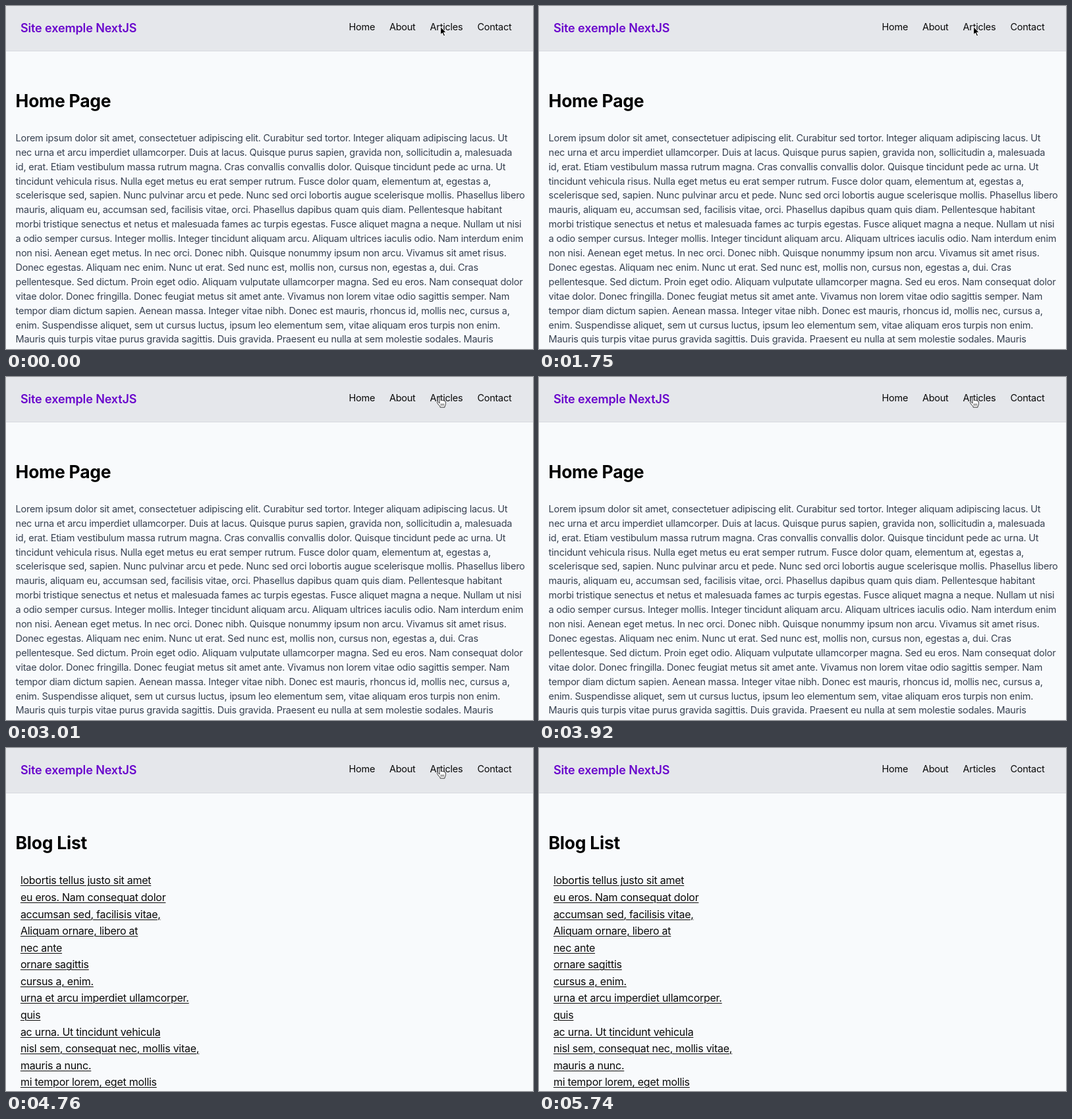
An HTML page for the animation above (5.81 s loop, 800 by 522 pixels).

```html
<!DOCTYPE html>
<html lang="fr">
<head>
<meta charset="utf-8">
<title>Site exemple NextJS</title>
<style>
  html, body { margin: 0; width: 100%; height: 100%; overflow: hidden; }
  body {
    position: relative;
    background: #f8fafc;
    color: #0a0a0a;
    font: 14.5px/22px Inter, "Noto Sans", sans-serif;
    font-optical-sizing: none;
    letter-spacing: -.018em;
    white-space: pre;
    cursor: default;
  }
  header { position: absolute; inset: 0 0 auto; height: 68px; background: #e5e7eb; border-bottom: 1px solid #d7d9de; }
  .brand { position: absolute; left: 21.9px; top: 21.5px; font-size: 18px; line-height: 24px; font-weight: 600; letter-spacing: -.007em; color: #6906cc; }
  nav span { position: absolute; top: 20.7px; }
  h1 { position: absolute; left: 14.6px; top: 129px; margin: 0; font-size: 26.5px; line-height: 30px; font-weight: 700; letter-spacing: -.01em; color: #000; }
  p { position: absolute; left: 14.6px; top: 189.8px; margin: 0; line-height: 21.9px; color: #374151; }
  ul { position: absolute; left: 21.9px; top: 189.4px; margin: 0; padding: 0; list-style: none; font-size: 16px; line-height: 25.58px; letter-spacing: -.0165em; }
  li { text-decoration: underline 1px; text-underline-offset: 2px; }
  #cursor { position: absolute; left: 0; top: 0; width: 20px; height: 22px; overflow: visible; }
  [hidden] { display: none; }
</style>
</head>
<body>
<header>
  <div class="brand">Site exemple NextJS</div>
  <nav><span style="left:520.6px">Home</span><span style="left:582px">About</span><span style="left:643.6px">Articles</span><span style="left:715.4px">Contact</span></nav>
</header>

<main id="home"><h1>Home Page</h1><p>Lorem ipsum dolor sit amet, consectetuer adipiscing elit. Curabitur sed tortor. Integer aliquam adipiscing lacus. Ut
nec urna et arcu imperdiet ullamcorper. Duis at lacus. Quisque purus sapien, gravida non, sollicitudin a, malesuada
id, erat. Etiam vestibulum massa rutrum magna. Cras convallis convallis dolor. Quisque tincidunt pede ac urna. Ut
tincidunt vehicula risus. Nulla eget metus eu erat semper rutrum. Fusce dolor quam, elementum at, egestas a,
scelerisque sed, sapien. Nunc pulvinar arcu et pede. Nunc sed orci lobortis augue scelerisque mollis. Phasellus libero
mauris, aliquam eu, accumsan sed, facilisis vitae, orci. Phasellus dapibus quam quis diam. Pellentesque habitant
morbi tristique senectus et netus et malesuada fames ac turpis egestas. Fusce aliquet magna a neque. Nullam ut nisi
a odio semper cursus. Integer mollis. Integer tincidunt aliquam arcu. Aliquam ultrices iaculis odio. Nam interdum enim
non nisi. Aenean eget metus. In nec orci. Donec nibh. Quisque nonummy ipsum non arcu. Vivamus sit amet risus.
Donec egestas. Aliquam nec enim. Nunc ut erat. Sed nunc est, mollis non, cursus non, egestas a, dui. Cras
pellentesque. Sed dictum. Proin eget odio. Aliquam vulputate ullamcorper magna. Sed eu eros. Nam consequat dolor
vitae dolor. Donec fringilla. Donec feugiat metus sit amet ante. Vivamus non lorem vitae odio sagittis semper. Nam
tempor diam dictum sapien. Aenean massa. Integer vitae nibh. Donec est mauris, rhoncus id, mollis nec, cursus a,
enim. Suspendisse aliquet, sem ut cursus luctus, ipsum leo elementum sem, vitae aliquam eros turpis non enim.
Mauris quis turpis vitae purus gravida sagittis. Duis gravida. Praesent eu nulla at sem molestie sodales. Mauris</p></main>

<main id="blog" hidden><h1>Blog List</h1><ul><li>lobortis tellus justo sit amet</li><li>eu eros. Nam consequat dolor</li><li>accumsan sed, facilisis vitae,</li><li>Aliquam ornare, libero at</li><li>nec ante</li><li>ornare sagittis</li><li>cursus a, enim.</li><li>urna et arcu imperdiet ullamcorper.</li><li>quis</li><li>ac urna. Ut tincidunt vehicula</li><li>nisl sem, consequat nec, mollis vitae,</li><li>mauris a nunc.</li><li>mi tempor lorem, eget mollis</li></ul></main>

<svg id="cursor" stroke-linejoin="round">
  <path id="arrow" d="M0 0V12.2L2.8 9.6L5 14.4L7 13.5L4.9 8.9H8.6Z" fill="#000" stroke="#fff" stroke-width="1"/>
  <g id="hand" stroke="#222" stroke-width=".9">
    <path fill="#fff" d="M-1.5 8.5V-.6Q-1.5-1.9-.3-1.9T.9-.6V4.2Q1-.1 1 4.2Q2.1 3 3.3 4.4Q4.6 3.4 5.6 4.9Q7.8 4.4 7.8 6.6V9.2Q7.6 11.6 6.4 13.5V14.6H-.5V13.4Q-3 10.8-4.9 8.1Q-5.8 6.6-4.6 6.2Q-3.5 6-1.5 8.5Z"/>
    <path fill="none" stroke-width=".8" d="M.7 9V12.2M2.7 9V12.2M4.7 9V12.2"/>
  </g>
</svg>

<script>
const LOOP = 5810, STEP = 70;
const HOVER = 2240, NAVIGATE = 3990, LEAVE = 5180, GONE = 5670;
const get = id => document.getElementById(id);
const [home, blog, cursor, arrow, hand] = ['home', 'blog', 'cursor', 'arrow', 'hand'].map(get);

// Pointer hotspot over time: [ms, x, y]
const path = [
  [LEAVE, 659.6, 31.5], [5250, 618, 76], [5320, 498, 216], [5390, 418, 344],
  [5460, 400, 413], [5530, 385, 458], [5600, 382, 505], [GONE, 381, 530]
];

function pointerAt(t) {
  if (t <= LEAVE) return path[0].slice(1);
  const i = Math.max(1, path.findIndex(point => point[0] >= t));
  const [t0, x0, y0] = path[i - 1], [t1, x1, y1] = path[i];
  const k = (t - t0) / (t1 - t0);
  return [x0 + (x1 - x0) * k, y0 + (y1 - y0) * k];
}

function show(element, visible) {
  element.style.display = visible ? '' : 'none';
}

function render(now) {
  const t = Math.floor((now % LOOP) / STEP) * STEP;
  home.hidden = t >= NAVIGATE;
  blog.hidden = t < NAVIGATE;

  const overLink = t >= HOVER && t <= LEAVE;
  show(cursor, t < GONE);
  show(arrow, !overLink);
  show(hand, overLink);
  if (t < GONE) {
    const [x, y] = pointerAt(t);
    cursor.style.transform = `translate(${x}px, ${y}px)`;
  }
}

const start = performance.now();
function tick() {
  render(performance.now() - start);
  requestAnimationFrame(tick);
}
tick();
</script>
</body>
</html>
```
